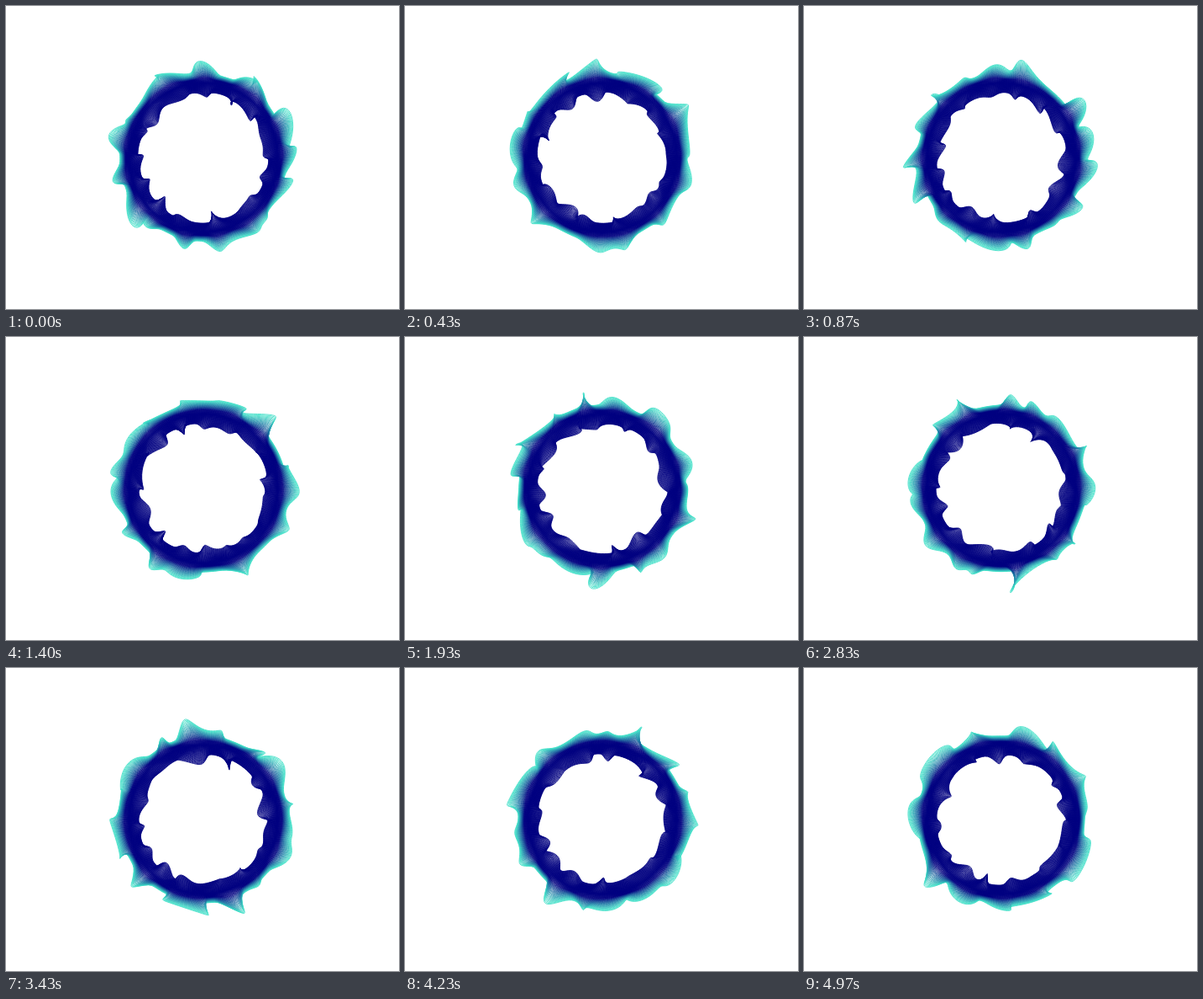
Write an HTML page with a canvas that moves like this. It is 468 px wide and 360 px high and loops after 5000 ms.

```html
<!DOCTYPE html>
<html lang="en">
<head>
<meta charset="utf-8">
<title>Rippling ring</title>
<style>
  html, body { margin: 0; width: 100%; height: 100%; overflow: hidden; background: #fff; }
  canvas { display: block; }
</style>
</head>
<body>
<canvas id="stage" width="468" height="360"></canvas>
<script>
const W = 468, H = 360;
const ctx = document.getElementById('stage').getContext('2d');
const LOOP = 5000, FPS = 30;
const CX = 235, CY = 180, MID = 88.5, HALF = 10;
const STEPS = 300, LINES = 42, WAVES = 10;
const DELAY = 0.22; // seconds by which the middle of the band trails its edges
const NAVY = [0, 0, 128], TEAL = [64, 224, 200];

let seed = 11;
function random() {
  seed = (seed * 1664525 + 1013904223) % 4294967296;
  return seed / 4294967296;
}

// Smooth noise around the circle: a few travelling waves of unit spread in total.
function makeNoise() {
  const waves = Array.from({ length: WAVES }, (_, i) => ({
    count: 4 + Math.floor(i * 1.5 + random() * 1.5),
    phase: random() * 2 * Math.PI,
    speed: (random() < 0.5 ? -1 : 1) * (2 + 3 * random())
  }));
  const size = Math.sqrt(2 / WAVES);
  return (angle, t) => {
    let sum = 0;
    for (const w of waves) sum += Math.cos(w.count * angle + w.phase + w.speed * t);
    return sum * size;
  };
}

const makeEdge = (mean, spread, sway) =>
  ({ mean, spread, sway, lift: makeNoise(), pull: makeNoise() });
const outer = makeEdge(6.5, 6, 0.06);
const inner = makeEdge(3, 4.5, 0.05);

const clamp = x => Math.min(1, Math.max(0, x));
const softPositive = x => (x + Math.sqrt(x * x + 9)) / 2;

function lineColour(u) {
  const tint = clamp((u - 0.38) / 0.57);
  return `rgb(${NAVY.map((c, i) => Math.round(c + (TEAL[i] - c) * tint)).join()})`;
}

// u runs from -1 at the hole to 1 at the outer rim.
function drawLine(u, t) {
  const edge = u > 0 ? outer : inner;
  const side = Math.sign(u), grow = u * u;
  const time = t - DELAY * (1 - Math.abs(u));
  ctx.strokeStyle = lineColour(u);
  ctx.beginPath();
  for (let i = 0; i < STEPS; i++) {
    const a = i / STEPS * 2 * Math.PI;
    const lift = softPositive(edge.mean + edge.spread * edge.lift(a, time));
    const r = MID + HALF * u + side * grow * Math.min(lift, 27);
    const angle = a + grow * edge.sway * edge.pull(a, time);
    ctx.lineTo(CX + r * Math.cos(angle), CY + r * Math.sin(angle));
  }
  ctx.closePath();
  ctx.stroke();
}

function draw(t) {
  ctx.fillStyle = '#fff';
  ctx.fillRect(0, 0, W, H);
  ctx.lineWidth = 0.85;
  ctx.lineJoin = 'round';
  for (let n = LINES; n >= -LINES; n--) drawLine(n / LINES, t);
}

const start = performance.now();
function tick() {
  const ms = (performance.now() - start) % LOOP;
  draw(Math.floor(ms * FPS / 1000) / FPS);
  requestAnimationFrame(tick);
}
tick();
</script>
</body>
</html>
```
